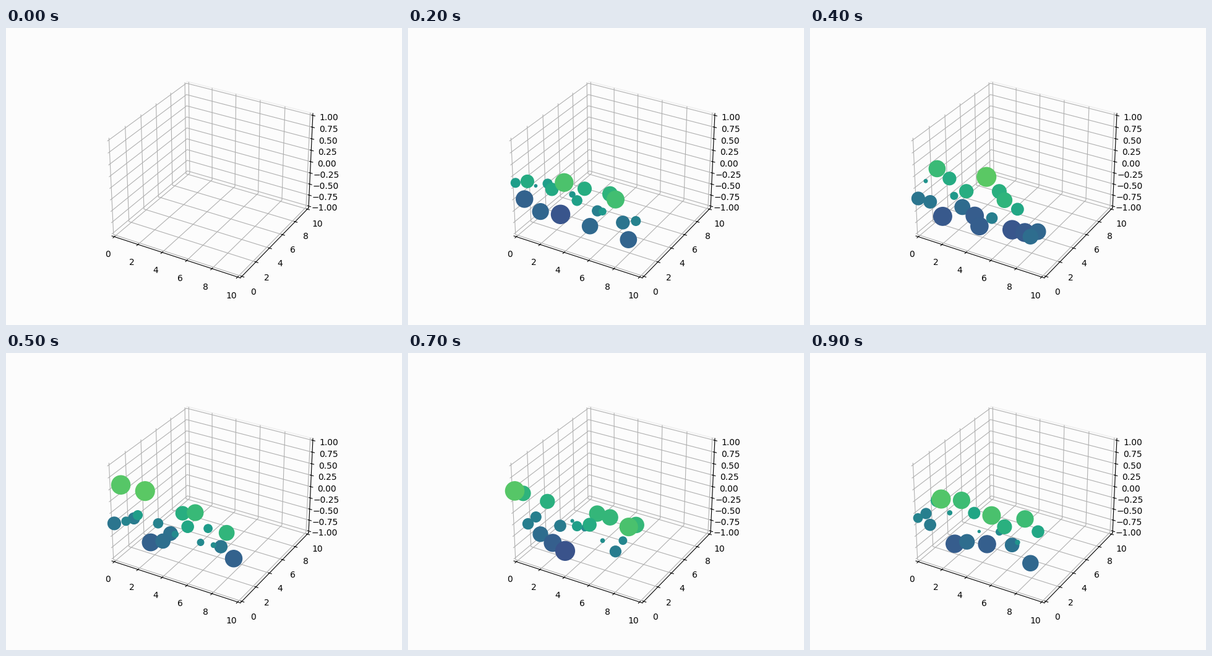
Animation of 640 by 480 pixels, one loop 1 s. Source, as a matplotlib script:

```python
import numpy as np
import matplotlib.pyplot as plt
from matplotlib.animation import FuncAnimation

STEPS, INTERVAL = 10, 100
SEED = 4
BACKGROUND = "#fcfcfc"
MARGIN = 1 / 48

# Two rows of ten dots along x: the front row at y = 0, the back row at y = 1.
X = np.tile(np.arange(10), 2)
Y = np.repeat([0, 1], 10)

fig = plt.figure(figsize=(6.4, 4.8), dpi=100, facecolor=BACKGROUND)
ax = fig.add_subplot(projection="3d", facecolor=BACKGROUND)
ax.set_xlim(0, 10, view_margin=MARGIN)
ax.set_ylim(0, 10, view_margin=MARGIN)
ax.set_zlim(-1, 1, view_margin=MARGIN)
for axis, edge in ((ax.xaxis, BACKGROUND), (ax.yaxis, "#eeeeee"),
                   (ax.zaxis, BACKGROUND)):
    axis.pane.set(facecolor=BACKGROUND, edgecolor=edge, alpha=1)


def clear():
    for dots in list(ax.collections):
        dots.remove()
    return []


def draw(step):
    """Give every dot a fresh random height; the first step shows none."""
    clear()
    if step == 0:
        return []
    z = np.random.default_rng([SEED, step]).uniform(-.5, .5, X.size)
    # Height sets the colour, distance from z = 0 sets the area.
    dots = ax.scatter(X, Y, z, c=z, s=1000 * np.abs(z), cmap="viridis",
                      vmin=-1, vmax=1, depthshade=False)
    return [dots]


anim = FuncAnimation(fig, draw, frames=STEPS, init_func=clear,
                     interval=INTERVAL, repeat=True)
plt.show()
```
